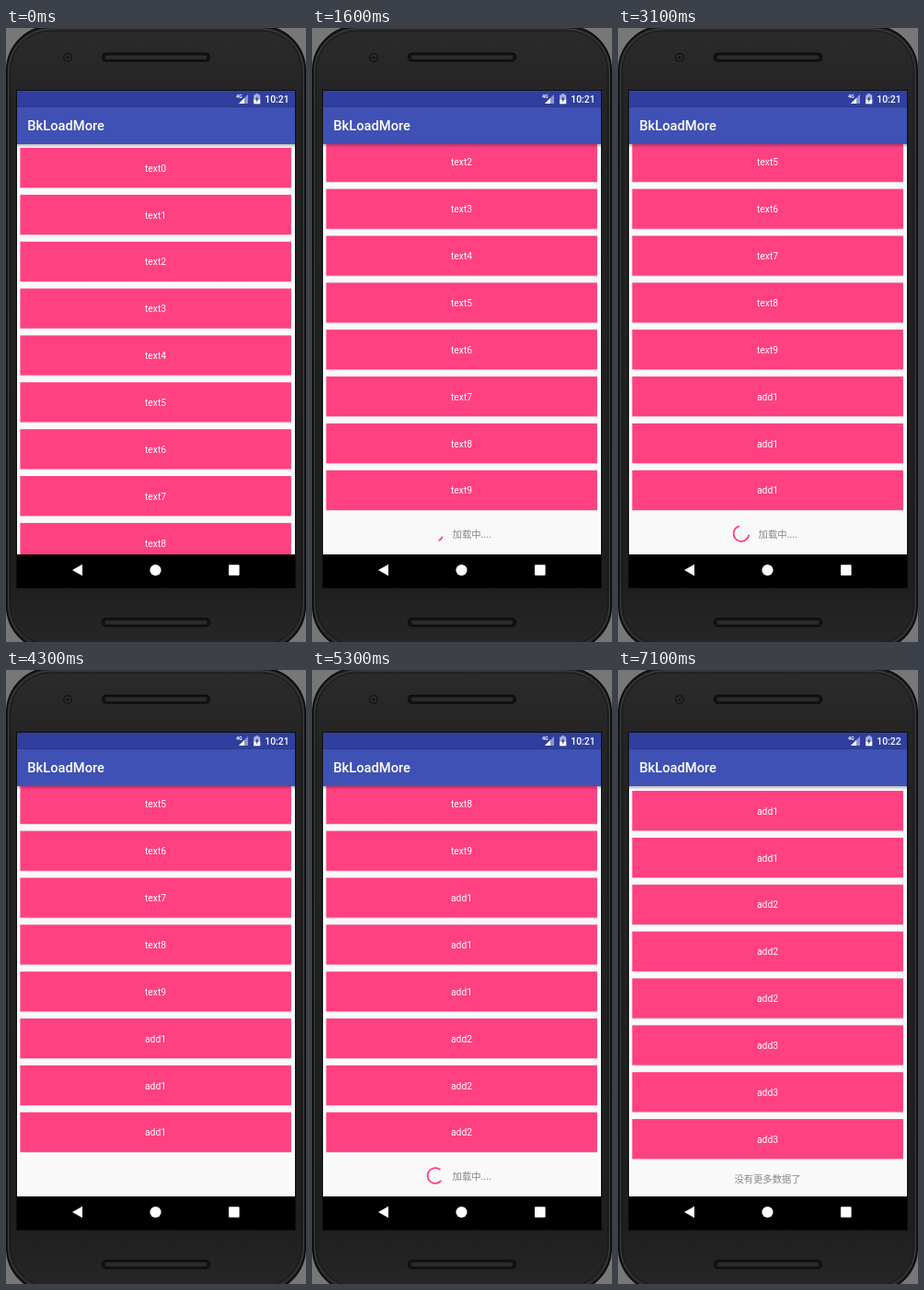
An HTML page with a canvas for the animation above (7600 ms loop, 326 by 666 pixels).

```html
<!DOCTYPE html>
<html lang="en">
<head>
<meta charset="utf-8">
<title>BkLoadMore</title>
<style>
  html, body { margin: 0; width: 100%; height: 100%; overflow: hidden; background: #777; }
  canvas { display: block; width: 326px; height: 666px; }
</style>
</head>
<body>
<canvas id="stage"></canvas>
<script>
const W = 326, H = 666, LOOP = 7600, STEP = 100;
const PINK = '#ff4081', LATIN = 'Roboto, sans-serif', CJK = '"Noto Sans CJK SC", "Noto Sans CJK", sans-serif';
const LIST = { x: 12, y: 126, w: 302, h: 445 };
const ROW = { x: 15.4, y: 130, w: 294.5, h: 43.2, pitch: 50.86 };

// [time, scroll offset]; the list jumps at each entry
const SCROLL = [[0, 0], [700, 108], [2700, 113], [2800, 260.6], [4700, 413.2],
                [6700, 455], [6800, 520], [6900, 558.4]];

// spin: phase origin of the spinner; leave: footer starts fading; add: new rows fade in
const LOADS = [
  { spin: 550, leave: 2200, add: 2300, left: 0.3 },
  { spin: 2670, leave: 4200, add: 4400, left: 0.6 },
  { spin: 4730, leave: 6200, add: 6300, left: 0.3 }
];

const canvas = document.getElementById('stage');
const dpr = window.devicePixelRatio || 1;
canvas.width = W * dpr;
canvas.height = H * dpr;
const ctx = canvas.getContext('2d');

function rect(x, y, w, h, fill) {
  ctx.fillStyle = fill;
  ctx.fillRect(x, y, w, h);
}

function pill(x, y, w, h, r, fill, stroke, width = 1) {
  ctx.beginPath();
  ctx.roundRect(x, y, w, h, r);
  if (fill) { ctx.fillStyle = fill; ctx.fill(); }
  if (stroke) { ctx.strokeStyle = stroke; ctx.lineWidth = width; ctx.stroke(); }
}

function dot(x, y, r, fill) {
  ctx.beginPath();
  ctx.arc(x, y, r, 0, Math.PI * 2);
  ctx.fillStyle = fill;
  ctx.fill();
}

function poly(points, fill) {
  ctx.beginPath();
  points.forEach(([x, y]) => ctx.lineTo(x, y));
  ctx.closePath();
  ctx.fillStyle = fill;
  ctx.fill();
}

function text(str, x, y, font, fill, align = 'left') {
  ctx.font = font;
  ctx.fillStyle = fill;
  ctx.textAlign = align;
  ctx.fillText(str, x, y);
}

function fade(x0, y0, x1, y1, ...stops) {
  const g = ctx.createLinearGradient(x0, y0, x1, y1);
  stops.forEach(([at, color]) => g.addColorStop(at, color));
  return g;
}

function drawPhone() {
  rect(0, 0, W, H, '#777');
  pill(0.8, -2, 324.4, 677, 48, '#1d1d1d', '#0c0c0c', 1.6);
  pill(2.6, 0.8, 320.8, 671, 46,
       fade(0, 0, 0, H, [0, '#2b2b2b'], [0.12, '#242424'], [0.9, '#1e1e1e'], [1, '#262626']),
       '#484848', 0.8);
  pill(4.6, 3, 316.8, 666, 44, null, '#191919', 1);
  for (const y of [27, 640]) {
    pill(104.5, y + 0.5, 117, 8.5, 4.2, '#151515', '#0b0b0b', 1.4);
    pill(108, y + 2.8, 110, 4, 2, '#2c2c2c');
  }
  dot(67, 32, 5, '#151515');
  dot(67, 32, 3.4, '#292c2e');
  dot(67, 32, 1.5, '#111');
  rect(11, 67, 304, 541, '#0d0d0d');
}

function drawBars(t) {
  rect(12, 126, 302, 4, fade(0, 126, 0, 130, [0, 'rgba(0,0,0,.26)'], [1, 'rgba(0,0,0,0)']));
  rect(12, 68, 302, 17.5, '#303f9f');
  rect(12, 85.5, 302, 40.5, '#3f51b5');
  text('BkLoadMore', 23.3, 111.3, '500 14.7px ' + LATIN, '#fff');

  text('4G', 250, 76, '700 5.4px ' + LATIN, '#fff');
  poly([[263, 72], [263, 82], [253, 82]], 'rgba(255,255,255,.45)');
  poly([[259, 76], [259, 82], [253, 82]], '#fff');
  rect(271, 71.4, 3.4, 1.4, '#b9bfe2');
  pill(269.2, 72.4, 7, 9.8, 0.7, '#b0b6dc');
  rect(269.2, 77.5, 7, 4.7, '#fff');
  poly([[273.3, 73.6], [270.9, 78], [272.4, 78], [272.2, 81], [274.6, 76.6], [273.3, 76.6]], '#303f9f');
  text(t < 7100 ? '10:21' : '10:22', 307.6, 80.7, '500 10.4px ' + LATIN, '#fff', 'right');

  rect(12, 571, 302, 36, '#000');
  poly([[72, 588], [83, 581.8], [83, 594.2]], '#fff');
  dot(162.5, 588, 6.1, '#fff');
  pill(242, 582.2, 11.6, 11.6, 0.8, '#fff');
}

function drawRow(i, top, alpha) {
  const label = i < 10 ? 'text' + i : 'add' + (Math.floor((i - 10) / 3) + 1);
  ctx.globalAlpha = alpha;
  rect(ROW.x, top + ROW.h, ROW.w, 1.6,
       fade(0, top + ROW.h, 0, top + ROW.h + 1.6, [0, 'rgba(0,0,0,.16)'], [1, 'rgba(0,0,0,0)']));
  rect(ROW.x, top, ROW.w, ROW.h, PINK);
  text(label, 162.5, top + 25.7, '10.3px ' + LATIN, '#fff', 'center');
  ctx.globalAlpha = 1;
}

// y of a cubic Bezier at a given x, found by bisection
function bezier(x, [x0, x1, x2, x3]) {
  let lo = 0, hi = 1;
  for (let n = 0; n < 24; n++) {
    const u = (lo + hi) / 2, v = 1 - u;
    const at = v * v * v * x0 + 3 * v * v * u * x1 + 3 * v * u * u * x2 + u * u * u * x3;
    if (at < x) lo = u; else hi = u;
  }
  return lo * lo * (3 - 2 * lo);
}

function drawSpinner(cx, cy, t) {
  const turn = Math.PI * 2, cycle = 4000 / 3;
  const p = (t % cycle) / cycle;
  const head = p < 0.5 ? bezier(p, [0, 0.2, 0.1, 0.5]) : 1;
  const tail = p > 0.5 ? bezier(p, [0.5, 0.7, 0.6, 1]) : 0;
  const base = (-0.25 + 0.25 * p + 2 * t / 4444) * turn;
  ctx.beginPath();
  ctx.arc(cx, cy, 8.4, base + 0.75 * tail * turn, base + (0.75 * head + 0.01) * turn);
  ctx.strokeStyle = PINK;
  ctx.lineWidth = 1.8;
  ctx.stroke();
}

function drawList(t) {
  const scroll = SCROLL.filter(([at]) => at <= t).pop()[1];
  const loaded = LOADS.filter(load => t >= load.add).length;
  const count = 10 + loaded * 3;
  const last = LOADS[loaded - 1];
  const entering = last && t < last.add + STEP;
  const topOf = i => ROW.y + ROW.pitch * i - scroll;

  ctx.save();
  ctx.beginPath();
  ctx.rect(LIST.x, LIST.y, LIST.w, LIST.h);
  ctx.clip();
  rect(LIST.x, LIST.y, LIST.w, LIST.h, '#f9f9f9');
  for (let i = 0; i < count; i++) {
    const top = topOf(i);
    if (top < 573 && top > 70) drawRow(i, top, entering && i >= count - 3 ? 0.5 : 1);
  }

  const foot = topOf(count), load = LOADS[loaded];
  if (!load) {
    text('没有更多数据了', 162.5, foot + 18.2, '10.3px ' + CJK, '#858585', 'center');
  } else if (t < load.leave + STEP) {
    ctx.globalAlpha = t < load.leave ? 1 : load.left;
    drawSpinner(134, foot + 17.9, Math.max(0, t - load.spin));
    text('加载中....', 152.6, foot + 22.2, '10.3px ' + CJK, '#858585');
    ctx.globalAlpha = 1;
  }
  ctx.restore();
}

function frame(now) {
  const t = Math.floor((now % LOOP) / STEP) * STEP;
  ctx.setTransform(dpr, 0, 0, dpr, 0, 0);
  drawPhone();
  drawList(t);
  drawBars(t);
}

const start = performance.now();
function tick() {
  frame(performance.now() - start);
  requestAnimationFrame(tick);
}
tick();
</script>
</body>
</html>
```
